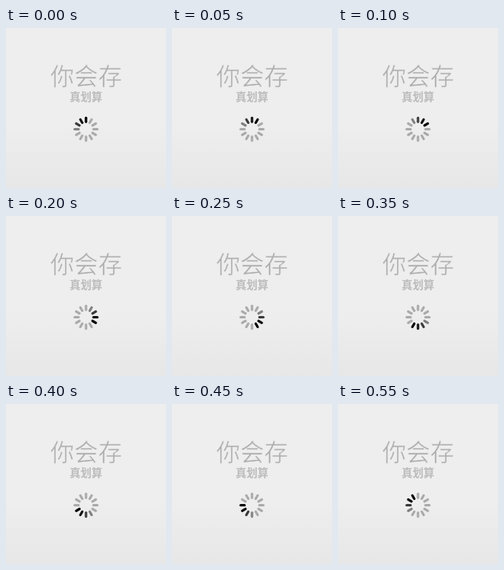
Recreate the animation shown at these times as an HTML page. Size 200 by 200 pixels, loop 0.6 s.

```html
<!DOCTYPE html>
<html lang="zh-CN">
<head>
<meta charset="utf-8">
<style>
  html, body { margin: 0; width: 100%; height: 100%; overflow: hidden; }
  svg { display: block; width: 100vw; height: 100vh; }
  text { font-family: "Noto Sans CJK SC", "Noto Sans CJK", sans-serif; text-anchor: middle; }
  /* the paper-coloured outline thins the strokes of the title */
  .title { font-size: 30px; font-weight: 300; fill: #aeaeae; stroke: #eee; stroke-width: .6; }
  .tagline { font-size: 13.7px; font-weight: 700; fill: #bcbcbc; }
  #spinner line { stroke: #aaa; stroke-width: 3; stroke-linecap: round; }
</style>
</head>
<body>
<svg viewBox="0 0 200 200">
  <defs>
    <linearGradient id="paper" x1="0" y1="0" x2="0" y2="1">
      <stop offset="0" stop-color="#eeeeee"/>
      <stop offset=".6" stop-color="#eeeeee"/>
      <stop offset="1" stop-color="#e7e7e7"/>
    </linearGradient>
  </defs>
  <rect width="200" height="200" fill="url(#paper)"/>
  <text class="title" x="100.3" y="71">你会存</text>
  <text class="tagline" x="100" y="90.7">真划算</text>
  <g id="spinner" transform="translate(100 126.5)"></g>
</svg>
<script>
  const COUNT = 12, STEP = 50;
  const TAIL = ['#000', '#101010', '#3a3a3a', '#808080'];
  const spinner = document.getElementById('spinner');

  const shades = Array.from({ length: COUNT + 1 }, (_, age) => ({
    offset: age / COUNT,
    stroke: TAIL[age % COUNT] || '#aaa',
    easing: 'steps(1, end)'
  }));

  for (let i = 0; i < COUNT; i++) {
    const spoke = document.createElementNS('http://www.w3.org/2000/svg', 'line');
    spoke.setAttribute('y1', -9.3);
    spoke.setAttribute('y2', -14.2);
    spoke.setAttribute('transform', `rotate(${i * 360 / COUNT})`);
    spinner.append(spoke);
    spoke.animate(shades, {
      duration: COUNT * STEP,
      delay: (i - COUNT) * STEP,
      iterations: Infinity
    });
  }
</script>
</body>
</html>
```
